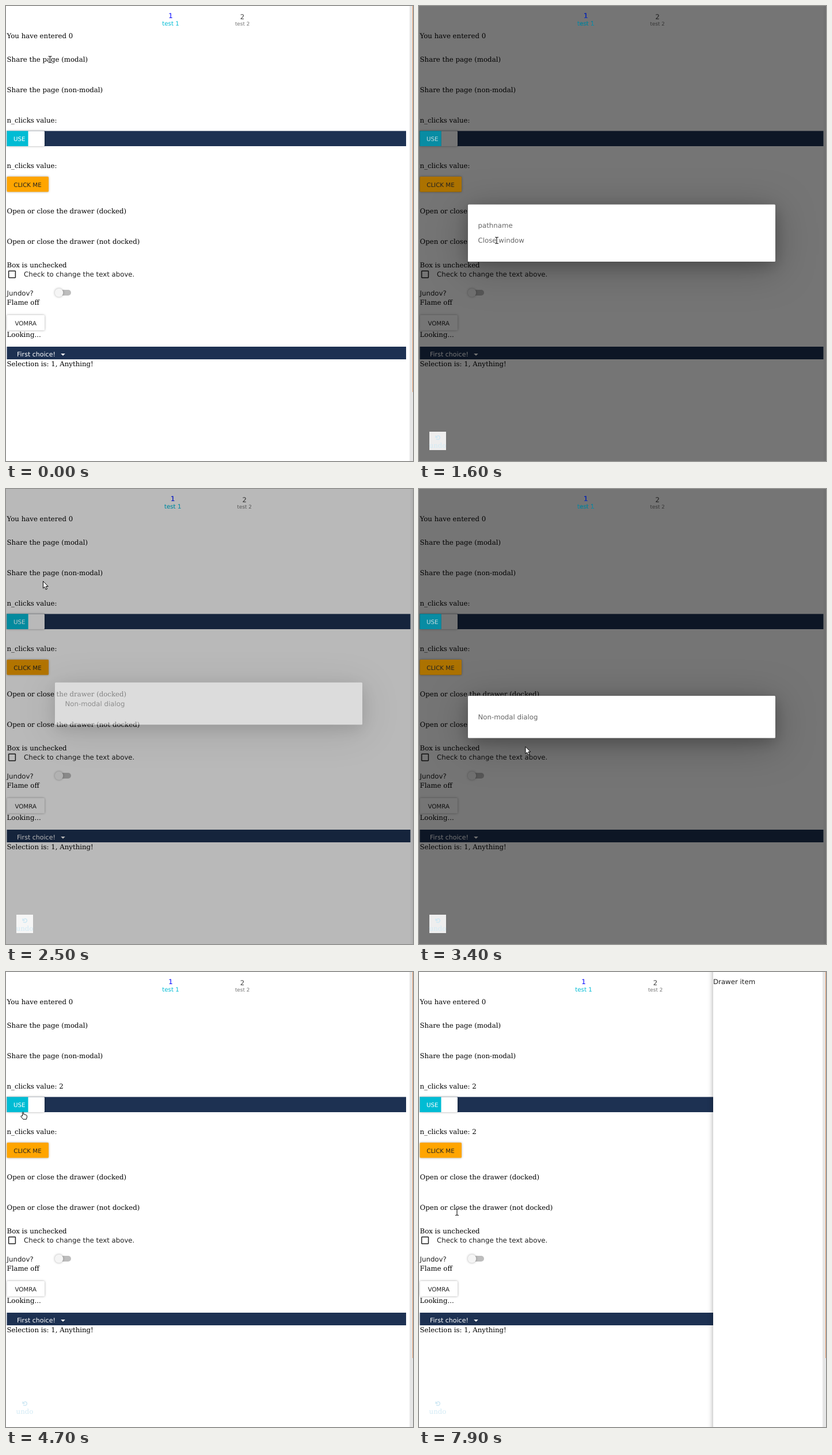
Animation, 707 px wide and 792 px high, one loop 8 s. Source, as an HTML page:

```html
<!DOCTYPE html>
<html lang="en">
<head>
<meta charset="utf-8">
<title>Component demo</title>
<style>
  html, body { margin: 0; width: 707px; height: 792px; overflow: hidden; background: #fff; }
  svg { display: block; }
  text { font: 11.77px "DejaVu Serif", serif; text-rendering: geometricPrecision; white-space: pre; }
  .sans text, text.sans { font-family: "DejaVu Sans", sans-serif; fill: #212121; }
  text.btn { font-size: 10.3px; }
  text.mid { text-anchor: middle; }
  .navy { fill: #1d3152; }
  .lift { filter: drop-shadow(0 .7px 2.2px rgba(0,0,0,.2)) drop-shadow(0 .7px 1.5px rgba(0,0,0,.16)); }
  .dialog rect { fill: #fff; filter: drop-shadow(0 7px 13px rgba(0,0,0,.22)) drop-shadow(0 10px 33px rgba(0,0,0,.25)); }
  .dialog text { fill: rgba(0,0,0,.6); }
  #drawer rect { filter: drop-shadow(0 2px 5px rgba(0,0,0,.36)); }
  #undo text { fill: #d2eaf5; }
  #undo path { fill: none; stroke: #cfe8f4; stroke-width: 1.5; }
  .cursor { fill: #fff; stroke: #000; stroke-width: 1; stroke-linejoin: round; }
</style>
</head>
<body>
<svg width="707" height="792" viewBox="0 0 707 792">
  <g class="tabs sans">
    <text class="mid" x="286" y="21" style="fill:#00f">1</text>
    <text class="mid btn" x="286" y="34" style="fill:#00bcd4">test 1</text>
    <text class="mid" x="410.6" y="23" style="fill:#444">2</text>
    <text class="mid" x="410.6" y="34" style="fill:#757575;font-size:8.83px">test 2</text>
  </g>

  <text x="1.5" y="56">You have entered 0</text>
  <text x="1.5" y="97">Share the page (modal)</text>
  <text x="1.5" y="150">Share the page (non-modal)</text>
  <text x="1.5" y="203">n_clicks value: <tspan id="count1"></tspan></text>
  <rect class="navy bar" x="1.5" y="217.5" width="693.5" height="26.5"/>
  <rect class="lift" x="1.5" y="217.5" width="65.5" height="26.5" rx="1.5" fill="#fff"/>
  <path d="M1.5 217.5H38.5V244H1.5z" fill="#00bcd4"/>
  <text class="sans btn" x="13" y="235.3" style="fill:#fff">USE</text>

  <text x="1.5" y="282">n_clicks value: <tspan id="count2"></tspan></text>
  <g class="lift">
    <rect x="1.5" y="297" width="72.5" height="26.5" rx="1.5" fill="#ffa500"/>
    <rect id="hover" x="1.5" y="297" width="72.5" height="26.5" rx="1.5" fill="#eaeaea"/>
  </g>
  <text class="sans btn" x="13.2" y="314.7">CLICK ME</text>

  <text x="1.5" y="361">Open or close the drawer (docked)</text>
  <text x="1.5" y="414">Open or close the drawer (not docked)</text>
  <text x="1.5" y="455">Box is unchecked</text>
  <rect x="4.6" y="461.2" width="11.8" height="11.8" rx=".7" fill="none" stroke="#212121" stroke-width="1.5"/>
  <text class="sans" x="31" y="471.3">Check to change the text above.</text>
  <text class="sans" x="1.5" y="504">Jundov?</text>
  <rect x="86.5" y="494" width="26.5" height="10" rx="5" fill="#bdbdbd"/>
  <circle class="lift" cx="92" cy="499" r="7.3" fill="#f5f5f5"/>
  <text x="1.5" y="519.5">Flame off</text>
  <rect class="lift" x="1.5" y="538" width="65.5" height="26.5" rx="1.5" fill="#fff"/>
  <text class="sans btn mid" x="34.2" y="555.5">VOMRA</text>
  <text x="1.5" y="575.5">Looking...</text>
  <rect class="navy bar" x="1.5" y="593" width="693.5" height="22"/>
  <text class="sans" x="19" y="610" style="fill:#fff;font-size:11.04px">First choice!</text>
  <path d="M95.2 605h7.6l-3.8 3.8z" fill="#fff"/>
  <text x="1.5" y="626.5">Selection is: 1, Anything!</text>

  <rect id="shade" width="707" height="792"/>
  <g id="tint">
    <g class="tabs sans">
      <text class="mid" x="286" y="21" style="fill:#0a32c8">1</text>
      <text class="mid btn" x="286" y="34" style="fill:#1491ac">test 1</text>
    </g>
    <path d="M1.5 217.5H38.5V244H1.5z" fill="#088ca3"/>
    <text class="sans btn" x="13" y="235.3" style="fill:#c4dde0">USE</text>
    <rect x="1.5" y="297" width="72.5" height="26.5" rx="1.5" fill="#ac7200"/>
    <text class="sans btn" x="13.2" y="314.7">CLICK ME</text>
  </g>

  <g id="undo">
    <rect x="18" y="741" width="29" height="32" fill="#fff" opacity=".88"/>
    <path d="M29.2 747.8v3.2h3.4M29.6 750.6Q32.5 746.6 35.4 748.8Q37.6 751.6 35 753.8Q32.4 755.4 30 753.6"/>
    <text class="mid" x="32.5" y="769">undo</text>
  </g>

  <g id="modal" class="dialog sans">
    <rect x="85" y="345.5" width="534" height="99.5" rx="1.5"/>
    <text x="102.5" y="386">pathname</text>
    <text x="102.5" y="412">Close window</text>
  </g>
  <g id="plain" class="dialog sans">
    <rect x="85" y="360" width="534" height="73.5" rx="1.5"/>
    <text x="102.5" y="401">Non-modal dialog</text>
  </g>

  <g id="drawer" class="sans">
    <rect x="511" y="-20" width="192" height="832" fill="#fff"/>
    <text x="511" y="20.5">Drawer item</text>
  </g>

  <g id="scrollbar">
    <path d="M701 0H707V792H701z" fill="#e6e6e6"/>
    <path d="M706 0H707V672H706z" fill="#e59a6c"/>
  </g>

  <path id="arrow" class="cursor" d="M.5 .5V12.8L3.2 10.3L5.3 15L7.4 14L5.4 9.5H9.2z"/>
  <g id="beam" fill="none">
    <path id="stem" d="M-3 -5.5H-1L0 -4.5L1 -5.5H3M0 -4.5V4.5M-3 5.5H-1L0 4.5L1 5.5H3" stroke="#fff" stroke-width="2.6"/>
    <use href="#stem" style="stroke:#222"/>
    <path d="M-3 -5.5H-1L0 -4.5L1 -5.5H3M0 -4.5V4.5M-3 5.5H-1L0 4.5L1 5.5H3" stroke="#222" stroke-width="1.2"/>
  </g>
  <path id="hand" class="cursor" d="M-.8 7V.8Q.2 -.6 1.2 .8V4.2Q2.6 3.6 3.4 4.6Q4.8 4.2 5.5 5.3Q7 5.2 7 6.6V9.2L6 12.6H.4L-3.4 8Q-3.4 6 -1.8 6.6z"/>
</svg>
<script>
const LOOP = 8000, STEP = 100, FADE = 450, RISE = 47;
const $ = id => document.getElementById(id);
const all = sel => document.querySelectorAll(sel);

// cubic-bezier(.23, 1, .32, 1)
function ease(x) {
  if (x <= 0) return 0;
  if (x >= 1) return 1;
  let lo = 0, hi = 1;
  for (let i = 0; i < 20; i++) {
    const s = (lo + hi) / 2, r = 1 - s;
    if (.69 * r * r * s + .96 * r * s * s + s * s * s < x) lo = s; else hi = s;
  }
  return 1 - (1 - lo) ** 3;
}
const ramp = (t, start) => ease((t - start) / FADE);
const between = (t, open, close) => ramp(t, open) - ramp(t, close);

// time, x, y, shape from then on
const path = [
  [0, 76.5, 93, 'beam'], [400, 76.5, 93, 'beam'], [500, 190, 190, 'arrow'], [600, 297, 281.5, 'arrow'],
  [800, 290, 340, 'arrow'], [1200, 150, 418, 'beam'], [1400, 140, 410, 'beam'], [1600, 135, 408, 'beam'],
  [1700, 95, 285, 'arrow'], [1800, 62, 177, 'arrow'], [2000, 58, 146, 'beam'], [2400, 58, 146, 'beam'],
  [2500, 64, 160, 'arrow'], [3200, 180, 445, 'arrow'], [3400, 184.5, 448, 'arrow'], [3600, 35, 285, 'arrow'],
  [3900, 28, 236, 'hand'], [4100, 27, 232, 'hand'], [4600, 27, 232, 'hand'], [5300, 43.5, 314, 'hand'],
  [6000, 43.5, 314, 'hand'], [6200, 64, 340, 'arrow'], [6400, 80, 358, 'beam'], [6600, 80, 358, 'beam'],
  [6700, 110, 320, 'arrow'], [7400, 592, 6, 'arrow'], [7500, 592, 4, 'arrow'], [7900, 66, 418, 'beam'],
  [LOOP, 66, 418, 'beam']
];

function moveCursor(t) {
  const i = path.findIndex(p => p[0] > t);
  const [t0, x0, y0, shape] = path[i - 1], [t1, x1, y1] = path[i];
  const k = (t - t0) / (t1 - t0);
  for (const id of ['arrow', 'beam', 'hand']) $(id).style.display = id === shape ? '' : 'none';
  $(shape).setAttribute('transform', `translate(${x0 + (x1 - x0) * k} ${y0 + (y1 - y0) * k})`);
}

function setDialog(id, p, wide) {
  const g = $(id);
  g.style.opacity = p;
  g.setAttribute('transform', `translate(${wide ? 0 : -2} ${-RISE * (1 - p)})`);
  g.firstElementChild.setAttribute('width', wide ? 534 : 530);
}

function draw(t) {
  const wide = (t > 440 && t <= 1600) || (t > 2440 && t <= 3400);
  const dim = between(t, 440, 1600) + between(t, 2440, 3400);
  $('shade').style.opacity = .54 * dim;
  $('tint').style.opacity = dim;
  setDialog('modal', between(t, 440, 1640), wide);
  setDialog('plain', between(t, 2440, 3400), wide);
  $('scrollbar').style.display = wide ? 'none' : '';
  all('.tabs').forEach(g => g.setAttribute('transform', `translate(${wide ? 3.7 : 0} 0)`));
  all('.bar').forEach(r => r.setAttribute('width', wide ? 701 : 693.5));

  $('undo').style.display = t > 440 ? '' : 'none';
  $('count1').textContent = t < 4200 ? '' : t < 4600 ? '1' : '2';
  $('count2').textContent = t < 5500 ? '' : t < 5900 ? '1' : '2';
  $('hover').style.opacity = between(t, 5050, 6050);
  $('drawer').setAttribute('transform', `translate(${200 * (1 - ramp(t, 6560))} 0)`);
  moveCursor(t);
}

const start = performance.now();
function tick() {
  const t = (performance.now() - start) % LOOP;
  draw(Math.floor(t / STEP) * STEP);
  requestAnimationFrame(tick);
}
tick();
</script>
</body>
</html>
```
